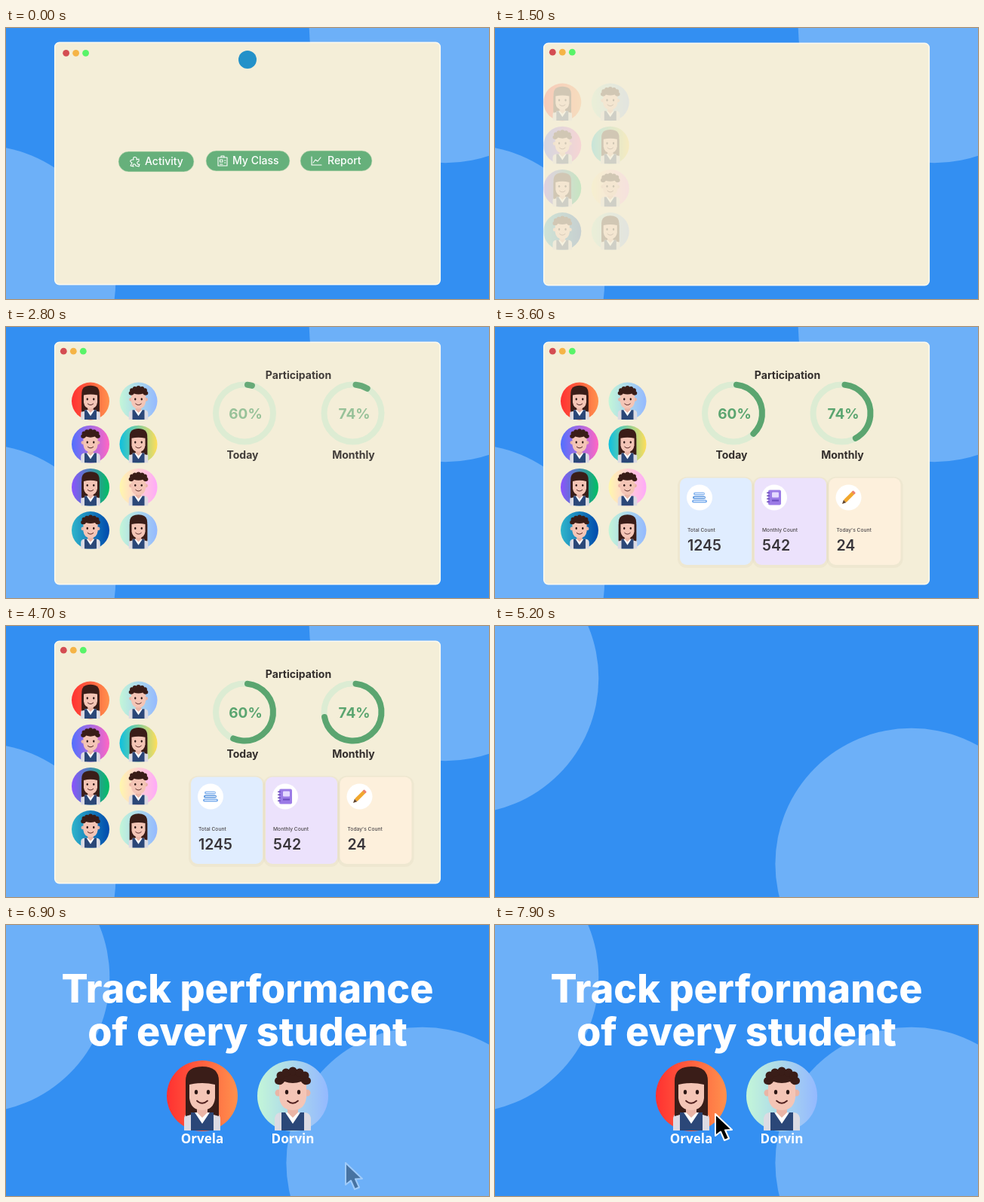
Animation of 640x360 px, one loop 8000 ms. Source, as an HTML page:

```html
<!DOCTYPE html>
<html lang="en">
<head>
<meta charset="utf-8">
<title>Track performance</title>
<style>
html, body { margin: 0; width: 100%; height: 100%; overflow: hidden; background: #338ff2; }
svg { display: block; width: 100%; height: 100%; }
text { font-family: Inter, "Open Sans", sans-serif; }
.mid { text-anchor: middle; }
.label { font-size: 14px; font-weight: 700; fill: #332e2c; }
.percent { font-size: 19px; font-weight: 700; fill: #5ba570; }
.button { font-size: 14px; font-weight: 500; fill: #fff; }
.count { font-size: 19.5px; font-weight: 600; fill: #38353a; }
.small { font-size: 6.7px; font-weight: 500; fill: #4d494c; }
.title { font-size: 52px; font-weight: 800; fill: #fff; }
.name { font: 700 17px "Noto Sans", "Open Sans", sans-serif; fill: #fff; }
.line { fill: none; stroke: #fff; stroke-width: 1.1; stroke-linejoin: round; stroke-linecap: round; }
</style>
</head>
<body>
<svg id="stage" viewBox="0 0 640 360" xmlns="http://www.w3.org/2000/svg"></svg>
<script>
const stage = document.getElementById('stage');

const text = (x, y, cls, value) => `<text x="${x}" y="${y}" class="${cls}">${value}</text>`;
const dot = (x, y, r, fill) => `<circle cx="${x}" cy="${y}" r="${r}" fill="${fill}"/>`;
const box = (x, y, w, h, r, fill) => `<rect x="${x}" y="${y}" width="${w}" height="${h}" rx="${r}" fill="${fill}"/>`;
const group = (id, content) => `<g id="${id}">${content}</g>`;

const backdrop = (...centers) => centers.map(([x, y]) => dot(x, y, 180.3, '#6db0f8')).join('');
const browser = (top, x, y) => backdrop([582, -1], [-35, 336])
  + `<rect x="64.7" y="${top}" width="510.6" height="321.5" rx="6" fill="#f4eed8" stroke="#fdfaf0" stroke-width="1.5"/>`
  + ['#d44d52', '#f5b446', '#58f468'].map((c, i) => dot(x + 13 * i, y, 4.4, c)).join('');

// People are drawn around the centre of a badge with radius 47.
const body = `<path d="M-24 46V31Q-24 23-16 22H16Q24 23 24 31V46Z" fill="#dcdbe3"/>
  <path d="M-8 22H8L10 26L0 38L-10 26Z" fill="#fff"/>
  <path d="M-15 46V22H-10L0 37L10 22H15V46Z" fill="#2b4778"/>
  <path d="M-7 12H7V22L0 29L-7 22Z" fill="#eab5a6"/>`;
const eye = x => `<ellipse cx="${x}" cy="-5" rx="2.2" ry="3" fill="#2c1715"/>`;
const face = eye(-8) + eye(8)
  + '<path d="M-7 6.5Q0 13 7 6.5" fill="none" stroke="#50201f" stroke-width="1.8" stroke-linecap="round"/>';
const girl = `<path d="M-22 27V-20Q-22-39 0-39T22-20V27Z" fill="#3a1d18"/>${body}
  <path d="M-22 27V-15H-15V25ZM22 27V-15H15V25Z" fill="#3a1d18"/>
  <path d="M-17-15Q0-19 17-15V3Q15 19 0 19T-17 3Z" fill="#f4c5b6"/>${face}`;
const curls = [[-19, -20, 5], [-16, -27, 5.5], [-9, -31, 5.5], [0, -33, 5.5], [9, -31, 5.5], [16, -27, 5.5], [19, -20, 5]]
  .map(([x, y, r]) => dot(x, y, r, '#3a1d18')).join('');
const boy = body + dot(-19, -4, 4.5, '#eab5a6') + dot(19, -4, 4.5, '#eab5a6')
  + `<path d="M-18-20H18V2Q16 19 0 19T-18 2Z" fill="#f4c5b6"/>
  <path d="M-19-15V-28Q0-36 19-28V-15Q14-14 11-19Q0-15-11-19Q-14-14-19-15Z" fill="#3a1d18"/>${curls}${face}`;

const students = [
  [girl, '#ff3131', '#ff914d'], [boy, '#c3f6d8', '#94b9ff'],
  [boy, '#5170ff', '#ff66c4'], [girl, '#0cc0df', '#ffde59'],
  [girl, '#8c52ff', '#00bf63'], [boy, '#fff7ad', '#ffa9f9'],
  [boy, '#2fb5cb', '#004aad'], [girl, '#c3f6d8', '#94b9ff']
];
const gradients = students.map(([, from, to], i) =>
  `<linearGradient id="grad${i}"><stop stop-color="${from}"/><stop offset="1" stop-color="${to}"/></linearGradient>`).join('');
const badge = (i, x, y, r) =>
  `<g transform="translate(${x} ${y}) scale(${r / 47})">${dot(0, 0, 47, `url(#grad${i})`)}${students[i][0]}</g>`;

const button = (x, y, w, textX, label, icon) =>
  `<rect x="${x}" y="${y}" width="${w}" height="27" rx="13.5" fill="#66b07b" stroke="#d5e2c2" stroke-width=".6"/>`
  + `<path class="line" transform="translate(${x + 15} ${y + 7})" d="${icon}"/>` + text(textX, y + 18.3, 'button', label);
const buttons =
  button(149, 164, 100, 184, 'Activity', 'M3 4H5Q4 0 7 .5T9 4L12 3V6Q9 7 10 9T13 10L12 13L8 12Q7 9 5 10T5 13L1 12L3 8Q0 7 1 5Z')
  + button(265, 163, 111, 300, 'My Class', 'M1 2H13V13H1ZM5 2V0H9V2M3.5 5H7V8H3.5ZM3.5 11H7M9.5 6H11M9.5 9H11')
  + button(390, 163, 95, 426, 'Report', 'M0 1V12H13M2 9L5 5L8 7L12 2');

const ring = (id, x, percentX, percent, labelX, label) => `
  <g fill="none" stroke-width="8" stroke-linecap="round">
    <circle cx="${x}" cy="114.5" r="38" stroke="#dcecd3"/>
    <circle id="${id}" cx="${x}" cy="114.5" r="38" stroke="#5ba570" pathLength="360" transform="rotate(-84 ${x} 114.5)"/>
  </g>` + group(id + 'Percent', text(percentX, 122, 'percent mid', percent)) + text(labelX, 174.5, 'label mid', label);

const card = (x, fill, label, value, icon) =>
  `<rect x="${x - 3}" y="199" width="101" height="121" rx="12" fill="#b9a98c" opacity=".1"/>`
  + box(x, 200.5, 95, 115.5, 9, fill) + dot(x + 26, 226.5, 17, '#fff')
  + `<g transform="translate(${x + 26} 226.5)">${icon}</g>`
  + text(x + 10, 272, 'small', label) + text(x + 10, 296.5, 'count', value);
const books = box(-8, -7, 15, 4, 2, '#8db9ef') + box(-9, -2, 17, 4, 2, '#5b96de') + box(-10, 3, 20, 4, 2, '#79acec')
  + box(-6, -5.7, 12, 1.2, 0, '#e5f0ff') + box(-7, -.6, 14, 1.2, 0, '#e5f0ff') + box(-8, 4.4, 16, 1.2, 0, '#e5f0ff');
const notebook = box(-8, -10, 17, 20, 2, '#9b7be6') + box(-3, -7, 9, 7, 1, '#e5d9ff') + box(-3, 3, 9, 2, 0, '#6b4dc0')
  + [-7, -3, 1, 5].map(y => box(-10, y, 4, 1.5, .7, '#6747b8')).join('');
const pencil = `<g transform="rotate(45)">${box(-2.4, -10, 4.8, 17, 1, '#f1a72e') + box(-2.4, -11, 4.8, 3, 1, '#ed8173')}
  <path d="M-2.4 7H2.4L0 12Z" fill="#63462f"/></g>`;

stage.innerHTML = `<defs>${gradients}</defs>`
  + group('homePage', browser(19.2, 79.6, 33.3) + dot(320, 42, 12, '#2391c9') + buttons)
  + group('classPage', browser(20.2, 76.3, 32.2)
    + group('badges', students.map((_, i) => badge(i, 112 + 63.5 * (i % 2), 98.5 + 57.2 * (i >> 1), 25)).join(''))
    + group('participation', text(387.5, 69, 'label mid', 'Participation')
      + ring('today', 316, 317.5, '60%', 313.5, 'Today') + ring('monthly', 459.5, 461.5, '74%', 460.5, 'Monthly'))
    + group('cards', card(245, '#e0edff', 'Total Count', '1245', books)
      + card(344, '#ece2fc', 'Monthly Count', '542', notebook)
      + card(442.5, '#fdf0dc', 'Today\'s Count', '24', pencil)))
  + group('titlePage', backdrop([551.7, 316], [-43, 69.5])
    + group('headline', text(320, 103, 'title mid', 'Track performance') + text(320, 160, 'title mid', 'of every student'))
    + group('pair', badge(0, 260, 227, 47) + badge(1, 380, 227, 47)
      + text(260, 290, 'name mid', 'Orvela') + text(380, 290, 'name mid', 'Dorvin'))
    + group('cursor', `<path d="M0 0V29L7 23.5L12 35L18 32.5L13 21.5L22 21Z" fill="#000" stroke="#fff"
      stroke-width="2" stroke-linejoin="round"/>`));

const part = Object.fromEntries([...stage.querySelectorAll('[id]')].map(el => [el.id, el]));
const progress = (t, from, to) => Math.min(1, Math.max(0, (t - from) / (to - from)));
const smooth = p => .5 - .5 * Math.cos(Math.PI * p);
const mix = (a, b, p) => a + (b - a) * p;
const fade = (el, opacity) => el.setAttribute('opacity', opacity);
const move = (el, x, y) => el.setAttribute('transform', `translate(${x} ${y})`);
const show = (el, visible) => el.setAttribute('display', visible ? 'inline' : 'none');

// Rings fill at a constant speed up to their final angle.
function sweep(el, t, start, finalAngle) {
  const angle = Math.min(finalAngle, Math.max(0, .151 * (t - start)));
  el.setAttribute('stroke-dasharray', `${angle} 360`);
  show(el, angle > 0);
}

function draw(t) {
  show(part.homePage, t < 1000);
  show(part.classPage, t >= 1000 && t < 4890);
  show(part.titlePage, t >= 4890);

  const enter = progress(t, 1385, 2035);
  fade(part.badges, enter);
  move(part.badges, -33 * (1 - enter) ** 1.9, 0);
  fade(part.participation, progress(t, 2250, 2850));
  for (const id of ['todayPercent', 'monthlyPercent']) fade(part[id], progress(t, 2500, 2960));
  sweep(part.today, t, 2740, 197);
  sweep(part.monthly, t, 2640, 254);
  fade(part.cards, progress(t, 2900, 3450));

  fade(part.headline, progress(t, 5300, 5900));
  fade(part.pair, progress(t, 6350, 6900));
  const point = smooth(progress(t, 6900, 7700));
  fade(part.cursor, progress(t, 6850, 7000));
  move(part.cursor, mix(450, 292, point), mix(316, 251, point));
}

function tick() {
  draw(performance.now() % 8000);
  requestAnimationFrame(tick);
}
tick();
</script>
</body>
</html>
```
